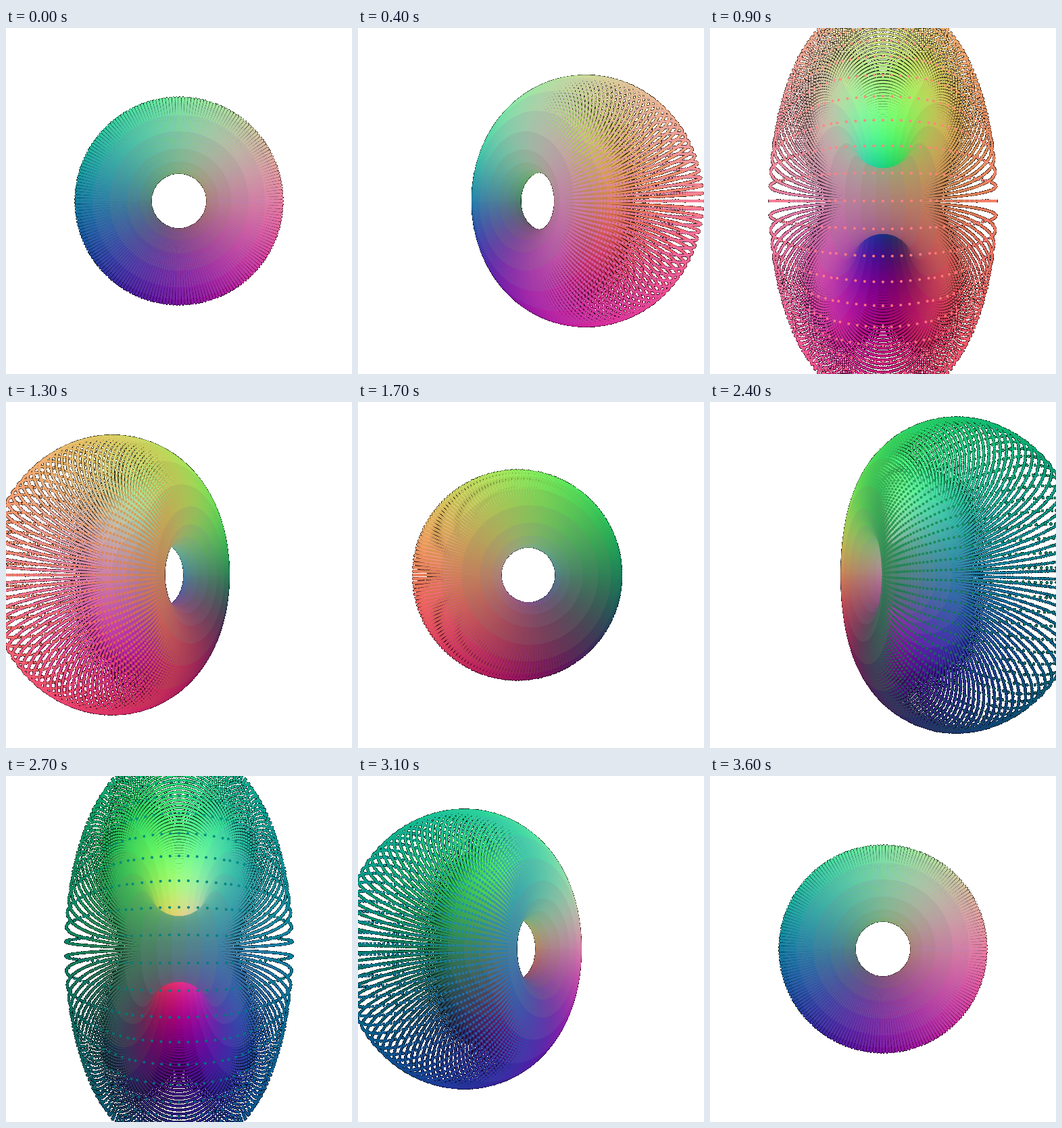
Animation, 512 px wide and 512 px high, one loop 3.7 s. Source, as an HTML page without scripts:

```html
<!DOCTYPE html>
<html lang="en">
<head>
<meta charset="utf-8">
<title>Turning torus</title>
<style>
/* turn of the torus */
@property --a { syntax: "<angle>"; inherits: true; initial-value: 0deg }
@property --s { syntax: "<number>"; inherits: true; initial-value: 0 }
@property --c { syntax: "<number>"; inherits: true; initial-value: 1 }
/* ring: angle, its cosine and sine, depth slope, tube angle nearest the eye */
@property --th { syntax: "<angle>"; inherits: true; initial-value: 0deg }
@property --p { syntax: "<number>"; inherits: true; initial-value: 0 }
@property --q { syntax: "<number>"; inherits: true; initial-value: 0 }
@property --m { syntax: "<number>"; inherits: true; initial-value: 0 }
@property --near { syntax: "<angle>"; inherits: true; initial-value: 0deg }
/* arc: tube angle, offsets, depth and its changes, screen place and step */
@property --ps { syntax: "<angle>"; inherits: false; initial-value: 0deg }
@property --u { syntax: "<number>"; inherits: false; initial-value: 0 }
@property --v { syntax: "<number>"; inherits: false; initial-value: 0 }
@property --w { syntax: "<number>"; inherits: false; initial-value: 1 }
@property --k { syntax: "<number>"; inherits: false; initial-value: 0 }
@property --h { syntax: "<number>"; inherits: false; initial-value: 0 }
@property --x { syntax: "<number>"; inherits: false; initial-value: 0 }
@property --y { syntax: "<number>"; inherits: false; initial-value: 0 }
@property --dx { syntax: "<number>"; inherits: false; initial-value: 0 }
@property --dy { syntax: "<number>"; inherits: false; initial-value: 0 }

html, body { margin: 0; width: 100%; height: 100%; overflow: hidden; background: #fff }
svg { display: block; width: 100%; height: 100% }

.torus {
  --s: sin(var(--a));
  --c: cos(var(--a));
  animation: turn 3700ms steps(37) infinite;
}
@keyframes turn { from { --a: 0deg } to { --a: 370deg } }

/* 201 rings, drawn from the far side to the near side */
.ring {
  --th: calc(((10 * var(--t) + var(--o)) * var(--g) + 100 * clamp(0, var(--s) * -1000000, 1)) * 360deg / 201);
  --p: cos(var(--th));
  --q: sin(var(--th));
  --m: calc(var(--p) * var(--s));
  --near: round(nearest, atan2(var(--c), var(--m) - .6), 20deg);
}

/* an arc of 11 dots on a parabola that follows the ring in perspective;
   the .002 terms keep the matrix from collapsing on straight rings */
.ring path {
  --ps: calc(var(--near) + var(--j) * 20deg);
  --u: calc(.3 * cos(var(--ps)));
  --v: calc(.3 * sin(var(--ps)));
  --h: calc(var(--u) * var(--m) + var(--v) * var(--c));
  --w: calc(1 - .6 * var(--m) - var(--h));
  --k: calc(.031733 * (var(--v) * var(--m) - var(--u) * var(--c)));
  --x: calc(147.8 * ((.6 + var(--u)) * var(--p) * var(--c) - var(--v) * var(--s)) / var(--w));
  --y: calc(-147.8 * (.6 + var(--u)) * var(--q) / var(--w));
  --dx: calc((-4.6901 * (var(--v) * var(--p) * var(--c) + var(--u) * var(--s)) - var(--x) * var(--k)) / var(--w));
  --dy: calc((4.6901 * var(--v) * var(--q) - var(--y) * var(--k)) / var(--w));
  transform: matrix(
    var(--dx), var(--dy),
    calc((.0005035 * (147.8 * (var(--v) * var(--s) - var(--u) * var(--p) * var(--c)) - var(--x) * var(--h)) - var(--dx) * var(--k)) / var(--w) - .002 * var(--dy)),
    calc((.0005035 * (147.8 * var(--u) * var(--q) - var(--y) * var(--h)) - var(--dy) * var(--k)) / var(--w) + .002 * var(--dx)),
    var(--x), var(--y));
  stroke: rgb(
    calc(141.7 * (.9 + (.6 + var(--u)) * var(--p)))
    calc(141.7 * (.9 + (.6 + var(--u)) * var(--q)))
    calc(141.7 * (.9 + var(--v))));
  d: path("M-5 25h.01M-4 16h.01M-3 9h.01M-2 4h.01M-1 1h.01M0 0h.01M1 1h.01M2 4h.01M3 9h.01M4 16h.01M5 25h.01");
  fill: none;
  stroke-width: 4px;
  stroke-linecap: round;
  vector-effect: non-scaling-stroke;
}
</style>
</head>
<body>
<svg viewBox="0 0 512 512">
  <defs>
    <!-- soft dot edges turn to black, leaving a hard outline -->
    <filter id="rim" filterUnits="userSpaceOnUse" x="-256" y="-256" width="512" height="512" color-interpolation-filters="sRGB">
      <feComponentTransfer in="SourceAlpha" result="edge">
        <feFuncA type="linear" slope="255" intercept="-8"/>
      </feComponentTransfer>
      <feMerge><feMergeNode in="edge"/><feMergeNode in="SourceGraphic"/></feMerge>
    </filter>
    <g id="ring" class="ring">
      <path style="--j:9"/>
      <path style="--j:8"/><path style="--j:-8"/>
      <path style="--j:7"/><path style="--j:-7"/>
      <path style="--j:6"/><path style="--j:-6"/>
      <path style="--j:5"/><path style="--j:-5"/>
      <path style="--j:4"/><path style="--j:-4"/>
      <path style="--j:3"/><path style="--j:-3"/>
      <path style="--j:2"/><path style="--j:-2"/>
      <path style="--j:1"/><path style="--j:-1"/>
      <path style="--j:0"/>
    </g>
    <g id="pair">
      <use href="#ring" style="--g:-1"/>
      <use href="#ring" style="--g:1"/>
    </g>
    <g id="ten">
      <use href="#pair" style="--o:10"/>
      <use href="#pair" style="--o:9"/>
      <use href="#pair" style="--o:8"/>
      <use href="#pair" style="--o:7"/>
      <use href="#pair" style="--o:6"/>
      <use href="#pair" style="--o:5"/>
      <use href="#pair" style="--o:4"/>
      <use href="#pair" style="--o:3"/>
      <use href="#pair" style="--o:2"/>
      <use href="#pair" style="--o:1"/>
    </g>
  </defs>
  <g transform="translate(256 256)" filter="url(#rim)">
    <g class="torus">
      <use href="#ten" style="--t:9"/>
      <use href="#ten" style="--t:8"/>
      <use href="#ten" style="--t:7"/>
      <use href="#ten" style="--t:6"/>
      <use href="#ten" style="--t:5"/>
      <use href="#ten" style="--t:4"/>
      <use href="#ten" style="--t:3"/>
      <use href="#ten" style="--t:2"/>
      <use href="#ten" style="--t:1"/>
      <use href="#ten" style="--t:0"/>
      <use href="#ring" style="--t:0;--o:0;--g:1"/>
    </g>
  </g>
</svg>
</body>
</html>
```
